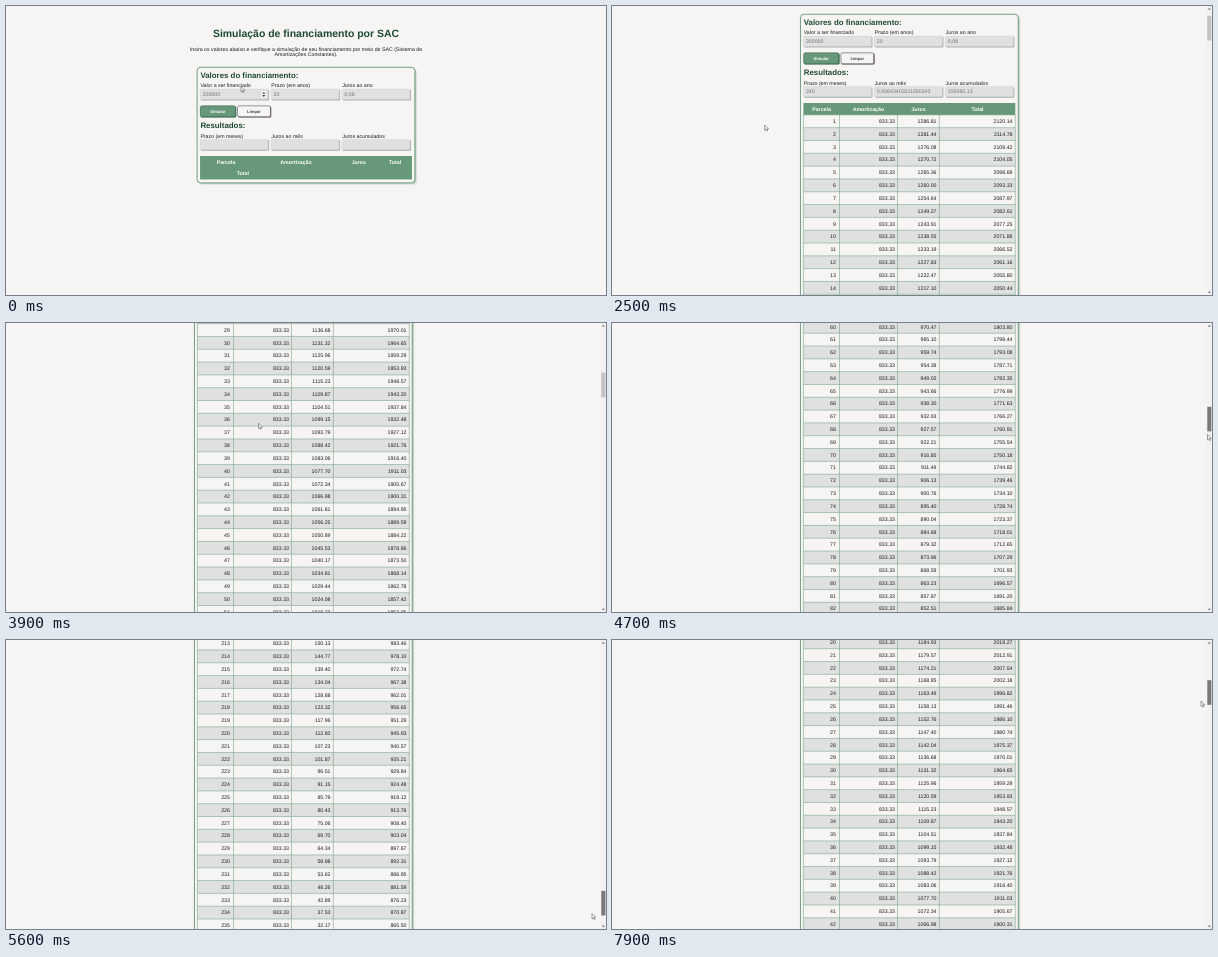
Animation, 600 px wide and 289 px high, one loop 8000 ms. Source, as an HTML page:

```html
<!DOCTYPE html>
<html lang="pt-BR">
<head>
<meta charset="utf-8">
<title>Simulação de financiamento por SAC</title>
<style>
html, body { margin: 0; width: 100%; height: 100%; overflow: hidden; background: #f6f5f3; }
svg { display: block; width: 600px; height: 289px; }
text { font: 16.8px "Liberation Sans", Arial, sans-serif; fill: #1c1c1c; text-rendering: geometricPrecision; white-space: pre; }
.h1 { font-size: 33.5px; font-weight: bold; fill: #1f4a31; }
.h2 { font-size: 25.2px; font-weight: bold; fill: #1f4a31; }
.th { font-weight: bold; fill: #fff; }
.val { fill: #707473; }
.btn { font-size: 13.3px; font-weight: bold; }
.mid { text-anchor: middle; }
.end { text-anchor: end; }
</style>
</head>
<body>
<svg id="stage" viewBox="0 0 1920 924.8">
  <g id="page"></g>
  <g id="bar"></g>
  <path id="cursor" d="M0 0V17L4 13.3L6.6 19.4L9.4 18.2L6.8 12.2H12.2Z" fill="#fff" stroke="#333" stroke-width="1.5"/>
</svg>
<script>
const LOOP = 8000, STEP = 100, K = 3.2;       // K: page units per stage pixel
const VIEW = 924.8, DOC = 10452.5, ROW = 41, ROWS = 240;
const GREEN = '#68987a', PAPER = '#f6f5f3', GREY = '#dfe1e1';
const LEFT = 621, RIGHT = 1299, TOP = 480, BODY = 518;
const $ = id => document.getElementById(id);

function el(parent, tag, attrs, text) {
  const n = document.createElementNS('http://www.w3.org/2000/svg', tag);
  for (const k in attrs) n.setAttribute(k, attrs[k]);
  if (text !== undefined) n.textContent = text;
  parent.appendChild(n);
  return n;
}
const rect = (p, x, y, width, height, fill, more) =>
  el(p, 'rect', { x, y, width, height, fill, ...more });
const label = (p, x, y, s, cls = '') => el(p, 'text', { x, y, class: cls }, s);
const show = (n, on) => n.setAttribute('display', on ? 'inline' : 'none');

function card(p, bottom) {
  const h = bottom - 196;
  [[7, .1], [5, .16], [3, .24]].forEach(([d, o]) =>
    rect(p, 611 + d, 196 + d, 698, h, GREEN, { rx: 12, opacity: o }));
  rect(p, 611.5, 196, 697, h, PAPER, { rx: 11, stroke: GREEN, 'stroke-width': 3 });
}

function field(p, x, y, name, value) {
  label(p, x + 1, y - 6, name);
  rect(p, x + 2, y + 2, 219, 34, '#a9afac', { rx: 4 });
  rect(p, x, y, 218, 33, GREY, { rx: 4, stroke: '#c3c8c6' });
  return label(p, x + 8, y + 22.5, value, 'val');
}

function button(p, x, w, fill, edge, s, color) {
  rect(p, x + 2, 321, w, 36, edge, { rx: 5 });
  rect(p, x + 1, 319.5, w - 2, 35, fill, { rx: 5, stroke: edge, 'stroke-width': 2 });
  label(p, x + w / 2, 342, s, 'btn mid').style.fill = color;
}

const page = $('page');
const headings = el(page, 'g');
label(headings, 960, 100, 'Simulação de financiamento por SAC', 'h1 mid');
label(headings, 960, 143, 'Insira os valores abaixo e verifique a simulação de seu financiamento por meio de SAC (Sistema de', 'mid');
label(headings, 960, 161, 'Amortizações Constantes).', 'mid');

// Empty table
const empty = el(page, 'g');
card(empty, 566);
rect(empty, LEFT, TOP, RIGHT - LEFT, 75, GREEN);
[['Parcela', 704], ['Amortização', 928], ['Juros', 1129], ['Total', 1245]]
  .forEach(([s, x]) => label(empty, x, 504.5, s, 'th mid'));
label(empty, 758, 542, 'Total', 'th mid');

// Filled table
const full = el(page, 'g');
const cols = [736.5, 922, 1056], ends = [725, 914, 1047, 1290];
const foot = BODY + ROW * ROWS;
card(full, foot + 48);
rect(full, LEFT, TOP, RIGHT - LEFT, BODY - TOP, GREEN);
[['Parcela', 679], ['Amortização', 829], ['Juros', 989], ['Total', 1178]]
  .forEach(([s, x]) => label(full, x, 504.5, s, 'th mid'));

const loan = 200000, rate = 1.08 ** (1 / 12) - 1, quota = loan / ROWS;
let lines = `M${LEFT} ${BODY}V${foot}M${RIGHT} ${BODY}V${foot}`;
cols.forEach(x => lines += `M${x} ${BODY}V${foot}`);
for (let i = 0; i < ROWS; i++) {
  const y = BODY + ROW * i, interest = (loan - quota * i) * rate;
  if (i % 2) rect(full, LEFT, y, RIGHT - LEFT, ROW, GREY);
  [i + 1, quota.toFixed(2), interest.toFixed(2), (quota + interest).toFixed(2)]
    .forEach((s, c) => label(full, ends[c], y + 26, s, 'end'));
  lines += `M${LEFT} ${y}H${RIGHT}`;
}
el(full, 'path', { d: lines, stroke: GREEN, 'stroke-width': 1.6, fill: 'none' });
rect(full, LEFT, foot, RIGHT - LEFT, 36, GREEN);
[['Total', 0], ['R$ 200 000', 1], ['R$ 355 060,126', 3]]
  .forEach(([s, c]) => label(full, ends[c], foot + 24, s, 'th end'));

// Form
const form = el(page, 'g');
label(form, 622, 230, 'Valores do financiamento:', 'h2');
field(form, 621, 266, 'Valor a ser financiado', '200000');
field(form, 848, 266, 'Prazo (em anos)', '20');
field(form, 1075, 266, 'Juros ao ano', '0,08');
button(form, 621, 114, GREEN, '#3c6b50', 'Simular', '#fff');
button(form, 740, 107, PAPER, '#5b5558', 'Limpar', '#444');
label(form, 622, 391, 'Resultados:', 'h2');
const results = [
  [field(form, 621, 427, 'Prazo (em meses)', ''), '240'],
  [field(form, 848, 427, 'Juros ao mês', ''), '0,00643403011000343'],
  [field(form, 1075, 427, 'Juros acumulados', ''), '155060,13']
];
const spin = el(form, 'g');
rect(spin, 817, 272, 16, 22, '#f2f2f2');
el(spin, 'path', { d: 'M820 281L825 275L830 281ZM820 285L825 291L830 285Z', fill: '#444' });

// Scrollbar
const bar = $('bar');
rect(bar, 1903, 0, 17, VIEW, '#f1f1f1');
el(bar, 'path', { d: 'M1907 11L1911.5 6L1916 11ZM1907 914L1911.5 919L1916 914Z', fill: '#505050' });
const track = VIEW - 34;
const thumb = rect(bar, 1905, 17, 13, VIEW / DOC * track, '#c1c1c1');

// [ms, offset in stage pixels]
const scroll = [
  [2200, 0], [2500, 53], [2900, 180], [3300, 312.4], [3900, 520], [4400, 520], [4700, 920.4],
  [5600, 2881], [5900, 2965], [6100, 2977.4], [7000, 2977.4], [7900, 409.4]
];
// [ms, x, y]
const pointer = [
  [0, 235, 80.5], [300, 238, 84], [800, 213, 105], [1300, 213, 105], [2000, 192, 115],
  [2500, 152.7, 119], [2900, 153, 117], [3300, 158.5, 108.5], [3800, 184, 106],
  [4400, 595, 72], [4700, 595.5, 111.5], [5600, 586, 273.5], [5900, 586.5, 287],
  [7000, 586.5, 287.5], [7900, 589, 61]
];

function at(keys, t, c) {
  if (t <= keys[0][0]) return keys[0][c];
  for (let i = 1; i < keys.length; i++) {
    const a = keys[i - 1], b = keys[i];
    if (t <= b[0]) return a[c] + (b[c] - a[c]) * (t - a[0]) / (b[0] - a[0]);
  }
  return keys[keys.length - 1][c];
}

let last = -1;
function draw(time) {
  const t = Math.floor(time % LOOP / STEP) * STEP;
  if (t === last) return;
  last = t;
  const done = t >= 1200, y = at(scroll, t, 1) * K;
  page.setAttribute('transform', `translate(${done ? -8.5 : 0} ${-y})`);
  show(empty, !done);
  show(full, done);
  show(bar, done);
  show(spin, t < 500);
  results.forEach(([n, s]) => n.textContent = done ? s : '');
  thumb.setAttribute('y', 17 + y / DOC * track);
  thumb.setAttribute('fill', t >= 4400 ? '#787878' : '#c1c1c1');
  $('cursor').setAttribute('transform', `translate(${at(pointer, t, 1) * K} ${at(pointer, t, 2) * K})`);
}

const start = performance.now();
function tick() {
  draw(performance.now() - start);
  requestAnimationFrame(tick);
}
tick();
</script>
</body>
</html>
```
